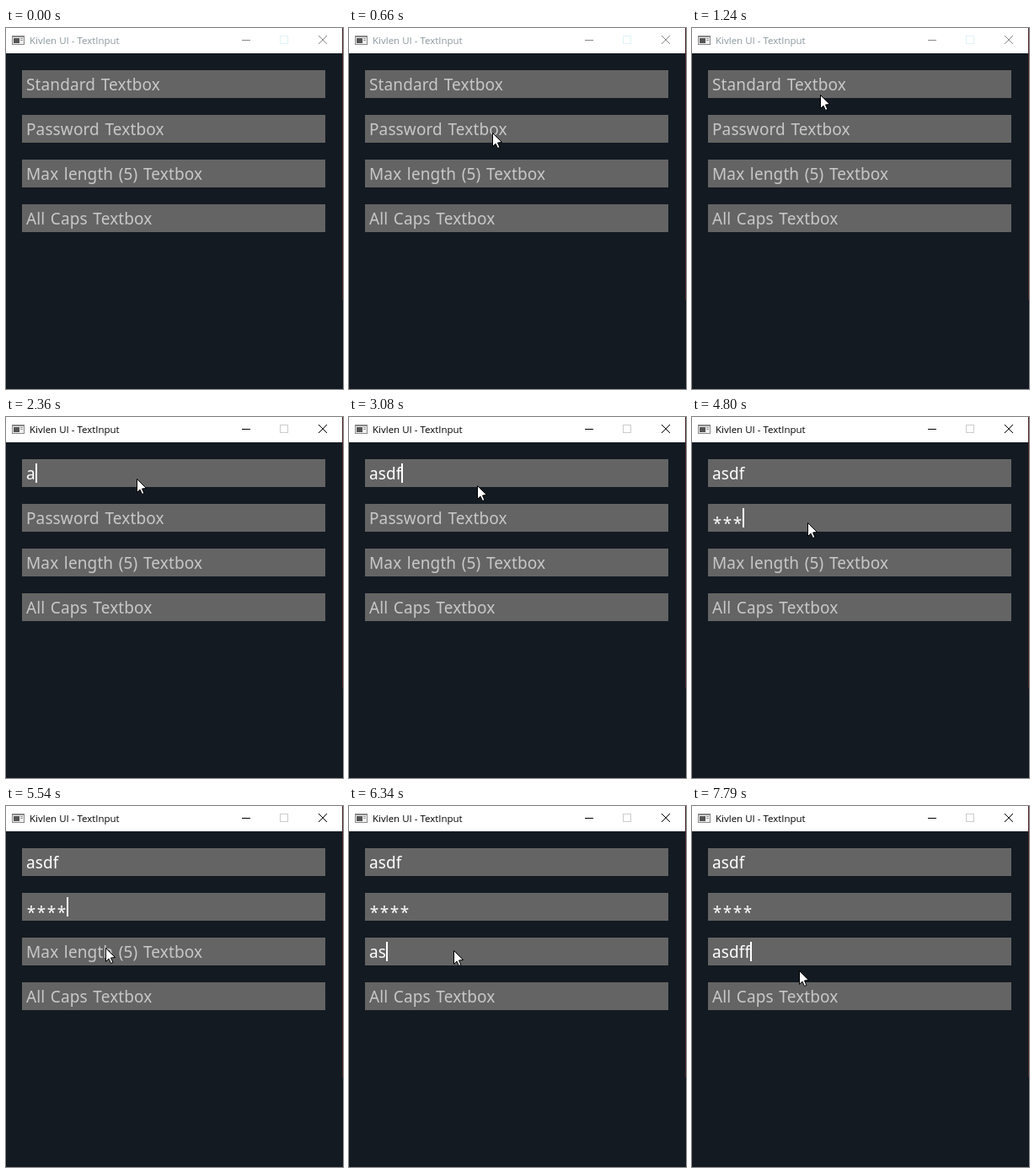
Recreate the animation shown at these times as an HTML page with a canvas. Size 400 by 428 pixels, loop 8000 ms.

```html
<!DOCTYPE html>
<html lang="en">
<head>
<meta charset="utf-8">
<title>Text inputs</title>
<style>
  html, body { margin: 0; width: 100%; height: 100%; overflow: hidden; background: #131a22; }
  canvas { display: block; }
</style>
</head>
<body>
<canvas id="stage" width="400" height="428"></canvas>
<script>
const ctx = document.getElementById('stage').getContext('2d');
const LOOP = 8000, LEFT = 24, STAR = 12;

// focus: time of the click; typed: time of the first key; gap: time between keys
const fields = [
  { hint: 'Standard Textbox', text: 'asdf', focus: 1420, typed: 2360, gap: 195 },
  { hint: 'Password Textbox', text: '****', focus: 3850, typed: 4370, gap: 215 },
  { hint: 'Max length (5) Textbox', text: 'asdff', focus: 5600, typed: 6070, gap: 260 },
  { hint: 'All Caps Textbox', text: '', focus: Infinity, typed: Infinity, gap: 1 }
];

// The pointer enters at the first place, then makes eased moves and rests between them
const entry = { x: 370, y: 409 };
const moves = [
  { from: 190, to: 460, x: 170, y: 125 },
  { from: 610, to: 1350, x: 151, y: 76 },
  { from: 1420, to: 1620, x: 155, y: 73 },
  { from: 2900, to: 3620, x: 138, y: 123 },
  { from: 4540, to: 4590, x: 137, y: 125 },
  { from: 5060, to: 5500, x: 118, y: 169 },
  { from: 5500, to: 5790, x: 110, y: 157 },
  { from: 5790, to: 5860, x: 122, y: 162 },
  { from: 6300, to: 6340, x: 124, y: 171 },
  { from: 6590, to: 7050, x: 125, y: 174 },
  { from: 7290, to: 7790, x: 127, y: 195 }
];

const clamp = (v, lo, hi) => Math.min(hi, Math.max(lo, v));

function rect(x, y, w, h, color) {
  ctx.fillStyle = color;
  ctx.fillRect(x, y, w, h);
}

function trace(points) {
  ctx.beginPath();
  points.forEach(([x, y]) => ctx.lineTo(x, y));
}

function line(points, color) {
  ctx.strokeStyle = color;
  trace(points);
  ctx.stroke();
}

function setFont(font, letter, word) {
  ctx.font = font;
  ctx.letterSpacing = letter;
  ctx.wordSpacing = word;
}

function drawTitleBar(active) {
  const ink = active ? '#000' : '#888';
  rect(0, 0, 400, 30, '#fff');

  rect(7, 9, 15, 11, '#888');
  rect(8, 11, 13, 8, '#f0f0f0');
  rect(9, 12, 7, 6, '#555');
  for (const y of [12, 14]) rect(17, y, 3, 1, '#999');

  setFont('11.5px "Open Sans", "Noto Sans", sans-serif', '0px', '0px');
  ctx.fillStyle = active ? '#000' : '#8a979c';
  ctx.fillText('Kivlen UI - TextInput', 28, 19);

  rect(280, 14, 10, 1, ink);
  ctx.strokeStyle = active ? '#ccc' : '#dff3f6';
  ctx.strokeRect(325.5, 9.5, 9, 9);
  line([[371, 9], [381, 19]], ink);
  line([[381, 9], [371, 19]], ink);
}

function drawField(field, row, t, focused) {
  const y = 50 + row * 53, baseline = y + 24;
  rect(19, y, 360, 33, '#646464');

  const count = clamp(Math.floor((t - field.typed) / field.gap) + 1, 0, field.text.length);
  const text = field.text.slice(0, count);
  const secret = text[0] === '*';
  setFont('19px "Noto Sans", "Open Sans", sans-serif', '0.12px', '1.5px');
  ctx.fillStyle = text ? '#fff' : '#c8c8c8';
  if (secret) {
    for (let i = 0; i < count; i++) ctx.fillText('*', LEFT + 0.7 + i * STAR, baseline + 6);
  } else {
    ctx.fillText(text || field.hint, LEFT, baseline);
  }

  // The caret blinks off after a pause and returns with the next key
  const blinkOff = !text && t - field.focus >= 640;
  if (focused && !blinkOff) {
    const width = secret ? count * STAR : ctx.measureText(text).width;
    rect(Math.round(LEFT + width), y + 5, 2, 23, '#fff');
  }
}

function pointerAt(t) {
  let { x, y } = entry;
  for (const m of moves) {
    const u = clamp((t - m.from) / (m.to - m.from), 0, 1);
    const e = u * u * (3 - 2 * u);
    x += (m.x - x) * e;
    y += (m.y - y) * e;
  }
  return [Math.round(x) + 0.5, Math.round(y) + 0.5];
}

function drawPointer(t) {
  if (t < moves[0].from) return;
  ctx.save();
  ctx.translate(...pointerAt(t));
  trace([[0, 0], [0, 16], [3.5, 12.6], [6, 18], [8.4, 17], [6, 11.5], [11, 11]]);
  ctx.closePath();
  ctx.fillStyle = '#fff';
  ctx.fill();
  ctx.strokeStyle = '#000';
  ctx.stroke();
  ctx.restore();
}

function draw(t) {
  rect(0, 0, 400, 428, '#131a22');
  drawTitleBar(t >= fields[0].focus);
  rect(399, 0, 1, 428, '#131a22');
  rect(399, 0, 1, 322, '#4a2226');
  const current = fields.filter(f => t >= f.focus).length - 1;
  fields.forEach((field, row) => drawField(field, row, t, row === current));
  drawPointer(t);
}

const start = performance.now();
function tick() {
  draw((performance.now() - start) % LOOP);
  requestAnimationFrame(tick);
}
tick();
</script>
</body>
</html>
```
